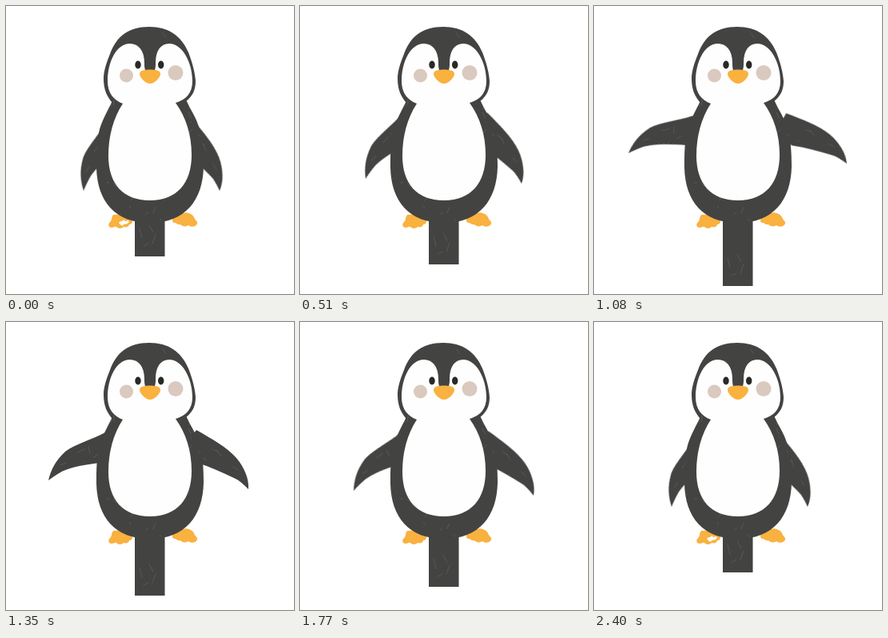
An HTML page for the animation above (2430 ms loop, 360 px wide and 360 px high).

```html
<!DOCTYPE html>
<html lang="en">
<head>
<meta charset="utf-8">
<title>Penguin on a stick</title>
<style>
  html, body { margin: 0; width: 100%; height: 100%; overflow: hidden; background: #fff; }
  svg { display: block; width: 100vw; height: 100vh; }
  .dark { fill: #434342; }
  .white { fill: #fefefe; }
  .orange { fill: #f9b13f; }
  .scratch { fill: none; stroke: #8b8b89; stroke-width: .6; stroke-linecap: round; opacity: .5; }
</style>
</head>
<body>
<svg viewBox="0 0 360 360">
  <defs>
    <clipPath id="coat"><use href="#head"/><use href="#body"/></clipPath>
  </defs>

  <g id="stick">
    <rect class="dark" x="161" y="-90" width="37.5" height="90"/>
    <path class="scratch" d="M167-35l3 12M179-39l5 9M187-27l-4 11M172-13l6-3"/>
  </g>

  <!-- Each wing is drawn with its tip at 0,0 -->
  <g id="left">
    <path class="dark" d="M0 0C3-13 9-25 21-36C34-46 53-50 71-60L90-40L75-23C54-21 39-19 24-14C15-11 8-6 0 0Z"/>
    <path class="scratch" d="M15-19l7-3M36-35l9-4M50-42l2 8M57-29l4-3"/>
  </g>
  <g id="right">
    <path class="dark" d="M0 0C1-13-5-27-15-39C-27-53-46-63-65-74L-84-50L-64-33C-48-28-33-21-18-14C-11-11-6-6 0 0Z"/>
    <path class="scratch" d="M-13-24l-6-4M-34-41l-5-7M-45-50l7 3M-53-36l-4-3"/>
  </g>

  <g class="orange">
    <path d="M134 261C131 265 133 267 130 270C127 273 128 277 132 277C135 277 136 275 138 276C140 279 146 278 147 276C150 277 154 276 154 273C158 273 159 269 157 266L150 260Z"/>
    <path d="M211 262C207 266 207 271 211 271C213 271 214 274 218 273C220 276 226 276 228 274C231 277 238 276 239 272C240 269 236 268 235 264C233 260 229 259 225 258Z"/>
  </g>
  <path id="gap" class="white" d="M141 271c2-3 5-1 6-4l2 2c5-2 6 1 3 3l-5 1c-1 3-4 1-6-2Z"/>

  <path id="head" class="dark" d="M179 26C153 26 138 38 130 60C125 72 122 82 122 91C122 104 126 114 134 122L180 150L225 119C233 113 237 105 237 94C236 82 233 71 228 58C219 37 203 26 179 26Z"/>
  <path id="body" class="dark" d="M136 112C130 126 121 140 117 154C113 170 113 185 113 202C114 244 136 271 180 271C224 271 246 243 247 201C247 181 246 164 240 148C236 136 228 126 223 112Z"/>
  <g id="chalk" class="scratch" clip-path="url(#coat)"></g>

  <path class="white" d="M180 86C173 83 173 77 173 71C173 55 165 47 155 47C138 47 127 70 127 94C127 109 135 118 146 122C134 140 128 163 128 187C128 222 146 243 180 243C214 243 232 221 232 186C232 161 225 139 212 121C225 117 233 109 233 94C233 70 220 47 204 47C194 47 187 55 187 71C187 77 187 83 180 86Z"/>
  <g fill="#dac9bf">
    <circle cx="150.5" cy="87" r="8.5"/>
    <circle cx="212" cy="83.5" r="9.5"/>
  </g>
  <g fill="#292928">
    <ellipse cx="165" cy="73.5" rx="3.7" ry="5"/>
    <ellipse cx="193.7" cy="73.5" rx="3.7" ry="5"/>
  </g>
  <path class="orange" d="M180 79.5C174 79.5 167 80 167 85C167 89 174 97 180 97C186 97 193 89 193 85C193 80 186 79.5 180 79.5Z"/>
</svg>
<script>
  const DURATION = 2430;
  const order = [0, 1, 2, 3, 4, 3, 2, 1, 0];
  // One row per pose: x, y, degrees
  const poses = {
    stick: [[0, 313, 0], [0, 323, 0], [0, 331, 0], [0, 342, 0], [0, 350, 0]],
    left: [[97, 231, -31], [82, 216, -20.5], [67, 211, -11], [53, 198, 0], [43, 184, 10]],
    right: [[267, 231, 20], [277, 222, 15.5], [292, 217, 6.3], [303, 209, 0], [316, 197, -9]]
  };
  const byId = id => document.getElementById(id);

  // Plays nine equal, held steps
  function hold(id, style) {
    const frames = [...order, 0].map((pose, i) => ({
      ...style(pose), offset: i / order.length, easing: 'steps(1, end)'
    }));
    const anim = byId(id).animate(frames, { duration: DURATION, iterations: Infinity });
    anim.startTime = 0;
    return anim;
  }

  let seed = 11;
  const rand = () => (seed = seed * 16807 % 2147483647) / 2147483647;
  function chalkPath(count) {
    let d = '';
    for (let i = 0; i < count; i++) {
      const x = 112 + rand() * 136, y = 28 + rand() * 242;
      d += `M${x.toFixed(1)} ${y.toFixed(1)}l${(rand() * 8 - 4).toFixed(1)} ${(rand() * 10 - 3).toFixed(1)}`;
    }
    return d;
  }
  const chalk = document.createElementNS('http://www.w3.org/2000/svg', 'path');
  chalk.setAttribute('d', chalkPath(55));
  byId('chalk').append(chalk);

  const anims = Object.keys(poses).map(id => hold(id, pose => {
    const [x, y, angle] = poses[id][pose];
    return { transform: `translate(${x}px, ${y}px) rotate(${angle}deg)` };
  }));
  anims.push(hold('gap', pose => ({ opacity: pose ? 0 : 1 })));

  const start = document.timeline.currentTime || 0;
  anims.forEach(anim => { anim.startTime = start; });
</script>
</body>
</html>
```
